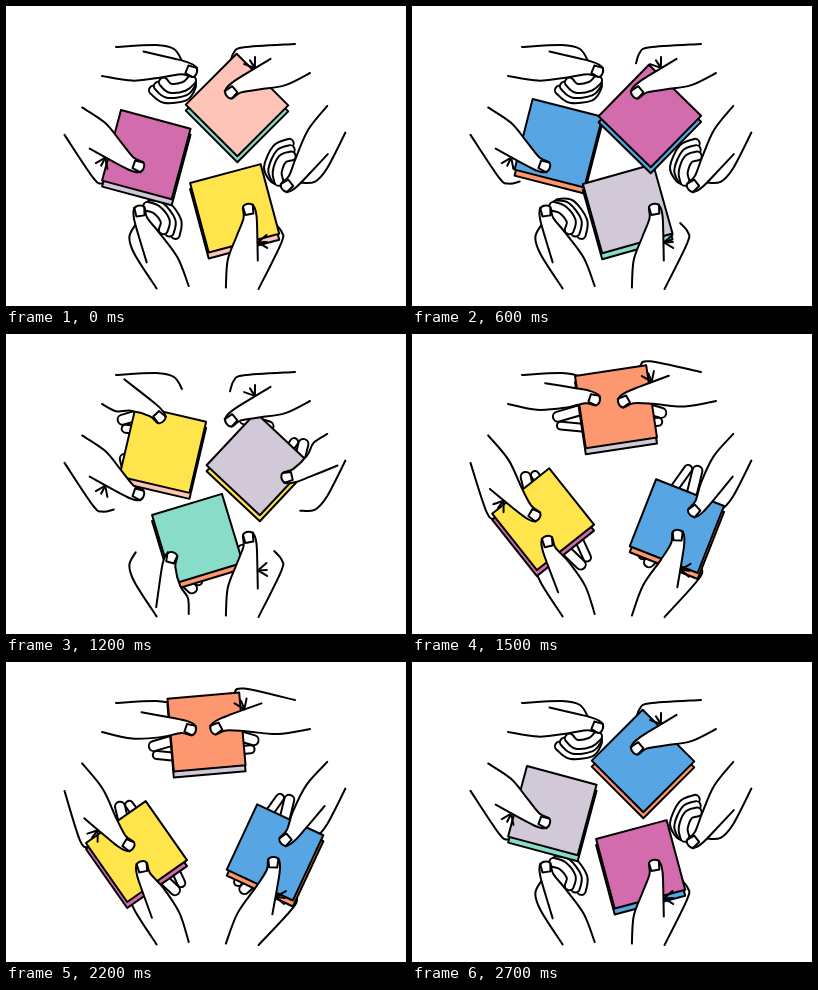
An HTML page with a canvas for the animation above (2.8 s loop, 400 by 300 pixels).

```html
<!DOCTYPE html>
<html lang="en">
<head>
<meta charset="utf-8">
<title>Passing books around</title>
<style>
html, body { margin: 0; width: 100%; height: 100%; overflow: hidden; background: #fff; }
canvas { display: block; width: 400px; height: 300px; }
</style>
</head>
<body>
<canvas id="stage" width="400" height="300"></canvas>
<script>
const ctx = document.getElementById('stage').getContext('2d');
const LOOP = 2800, STEP = 100, PASS = 675;
const CENTER = { x: 200, y: 150 };
const LINE = 2, STACK = 6, HALF_W = 36, HALF_H = 36.5;
const PALETTE = ['#ffc4b8', '#fd9770', '#88dcc8', '#d2c9d8', '#d26cac', '#ffe54b', '#57a5e2'];

// One pair of hands and one book, repeated with three-fold symmetry.
const SECTORS = [
  { turn: 0, cover: 0, under: 2 },
  { turn: -120, cover: 4, under: 3 },
  { turn: 120, cover: 5, under: 0 }
];

// Each key: time, x, y, angle in degrees
const BOOK_KEYS = [
  [35, 231, 99, -45], [125, 207.5, 75.5, -12], [175, 200.5, 70, -5], [260, 190, 64, -3],
  [400, 172, 79, 4], [450, 167, 93, 12], [640, 141, 149, 15]
];

// A hand follows its thumb tip; "side" is 1 for left and -1 for right.
const LEFT = {
  side: 1, top: [110, 41], low: [96, 70],
  keys: [[50, 191, 66, 15], [125, 186, 64, 10], [175, 190, 68, 12], [400, 173, 73, 22],
    [450, 166, 81, 32], [575, 153, 90, 45], [600, 191, 66, 15]]
};
const RIGHT = {
  side: -1, top: [289, 38], low: [304, 67],
  keys: [[35, 220, 89, 147], [125, 208, 70, 157], [200, 203, 67, 159], [300, 231, 82, 150],
    [400, 231, 82, 150], [450, 244, 101, 130], [525, 220, 89, 147]]
};

function sample(keys, time) {
  const next = keys.findIndex(k => k[0] >= time);
  if (next <= 0) return keys[next < 0 ? keys.length - 1 : 0].slice(1);
  const a = keys[next - 1], b = keys[next];
  const u = (time - a[0]) / (b[0] - a[0]);
  return a.slice(1).map((v, i) => v + (b[i + 1] - v) * u);
}

function rotate(x, y, degrees) {
  const r = degrees * Math.PI / 180, c = Math.cos(r), s = Math.sin(r);
  return [x * c - y * s, x * s + y * c];
}

function polyline(points) {
  ctx.beginPath();
  for (const p of points) ctx.lineTo(...p);
}

function curve(points) {
  const at = i => points[Math.max(0, Math.min(points.length - 1, i))];
  ctx.beginPath();
  ctx.moveTo(...points[0]);
  for (let i = 0; i < points.length - 1; i++) {
    const a = at(i - 1), b = at(i), c = at(i + 1), d = at(i + 2);
    ctx.bezierCurveTo(b[0] + (c[0] - a[0]) / 6, b[1] + (c[1] - a[1]) / 6,
      c[0] - (d[0] - b[0]) / 6, c[1] - (d[1] - b[1]) / 6, ...c);
  }
}

function finger(points, width) {
  curve(points);
  for (const [color, w] of [['#000', width + LINE], ['#fff', width - LINE]]) {
    ctx.strokeStyle = color;
    ctx.lineWidth = w;
    ctx.stroke();
  }
  ctx.strokeStyle = '#000';
  ctx.lineWidth = LINE;
}

// Adds a frame along the thumb and one upright at the heel of the hand.
function poseHand(arm, phase, state) {
  const [x, y, angle] = sample(arm.keys, phase);
  const along = (forward, inward) => {
    const [dx, dy] = rotate(forward, inward * arm.side, angle);
    return [x + dx, y + dy];
  };
  const heel = along(-32, 14);
  const fromHeel = (dx, dy) => [heel[0] + dx * arm.side, heel[1] + dy];
  return { ...arm, ...state, x, y, angle, along, heel, fromHeel };
}

function drawThumb({ side, low, heel, along }) {
  const forearm = [(heel[0] + low[0]) / 2, (heel[1] + low[1]) / 2 + 4];
  curve([along(-57, -6), along(-26, -7), along(-12, -7), along(-3, -5), along(0, 0),
    along(-3, 6), along(-14, 6), heel, forearm, low]);
  ctx.fillStyle = '#fff';
  ctx.fill();
  ctx.stroke();
  polyline([along(-1, -4), along(-10, -4), along(-11, 4), along(-3, 6)]);
  ctx.stroke();
  if (side > 0) return;
  for (const spread of [-6, 0, 7]) {
    polyline([along(-39, -7), along(-39 + spread, -16)]);
    ctx.stroke();
  }
}

function drawWrist({ side, top, y }) {
  const k = 0.7 * y - 19;
  curve(side > 0
    ? [top, [150, 39], [168, 43], [176, 55]]
    : [top, [238, k - 2], [228, k + 3], [224, k + 14]]);
  ctx.stroke();
}

function drawFingers({ curled, fromHeel }) {
  if (!curled) {
    finger([fromHeel(-8, 9), fromHeel(16, 2)], 10);
    finger([fromHeel(-5, 18), fromHeel(16, 20)], 8);
    return;
  }
  for (let i = 0; i < 3; i++) {
    finger([fromHeel(-9 + 5 * i, 13 - 4 * i), fromHeel(2 + 3 * i, 21 - 5 * i),
      fromHeel(22, 19 - 5 * i), fromHeel(29, 9 - 3 * i)], 9);
  }
}

// Knuckles and fingers wrapped around the thumb
function drawWrap({ top, x, y }) {
  const near = (dx, dy) => [x + dx, y + dy];
  curve([top, near(5, -32), near(-9, -20), near(-15, -3), near(-9, 13), near(5, 20),
    near(17, 21), near(35, 14), near(31, 6)]);
  ctx.stroke();
  curve([near(3, 4), near(8, 12), near(20, 11), near(31, 6)]);
  ctx.stroke();
}

function drawBack(hand) {
  if (hand.wrapped) {
    drawWrap(hand);
  } else {
    drawWrist(hand);
    drawFingers(hand);
  }
  if (!hand.holds) drawThumb(hand);
}

function inSector(sector, draw) {
  ctx.save();
  ctx.translate(CENTER.x, CENTER.y);
  ctx.rotate(sector.turn * Math.PI / 180);
  ctx.translate(-CENTER.x, -CENTER.y);
  draw();
  ctx.restore();
}

function drawBook([x, y, angle], sector, shift) {
  const [dx, dy] = rotate(x - CENTER.x, y - CENTER.y, sector.turn);
  const corners = [[-1, -1], [1, -1], [1, 1], [-1, 1]]
    .map(([sx, sy]) => rotate(sx * HALF_W, sy * HALF_H, angle + sector.turn));
  const sheet = (drop, color) => {
    polyline(corners.map(([cx, cy]) => [CENTER.x + dx + cx, CENTER.y + dy + cy + drop]));
    ctx.closePath();
    ctx.fillStyle = PALETTE[(color + shift) % PALETTE.length];
    ctx.fill();
    ctx.stroke();
  };
  sheet(STACK, sector.under);
  sheet(0, sector.cover);
}

function render(time) {
  const step = Math.floor((time % LOOP) / STEP);
  const phase = step * STEP % PASS;
  const leftHolds = phase >= 75 && phase < 600;
  const rightHolds = phase < 250 || phase >= 525;
  const hands = [
    poseHand(LEFT, phase, { holds: leftHolds, curled: !leftHolds }),
    poseHand(RIGHT, phase, { holds: rightHolds, wrapped: !rightHolds })
  ];
  const book = sample(BOOK_KEYS, phase);

  ctx.fillStyle = '#fff';
  ctx.fillRect(0, 0, 400, 300);
  ctx.strokeStyle = '#000';
  ctx.lineWidth = LINE;
  ctx.lineCap = ctx.lineJoin = 'round';

  for (const sector of SECTORS) inSector(sector, () => hands.forEach(drawBack));
  for (const sector of SECTORS) drawBook(book, sector, step);
  for (const sector of SECTORS) inSector(sector, () => hands.filter(h => h.holds).forEach(drawThumb));
}

const start = performance.now();
function tick() {
  render(performance.now() - start);
  requestAnimationFrame(tick);
}
tick();
</script>
</body>
</html>
```
